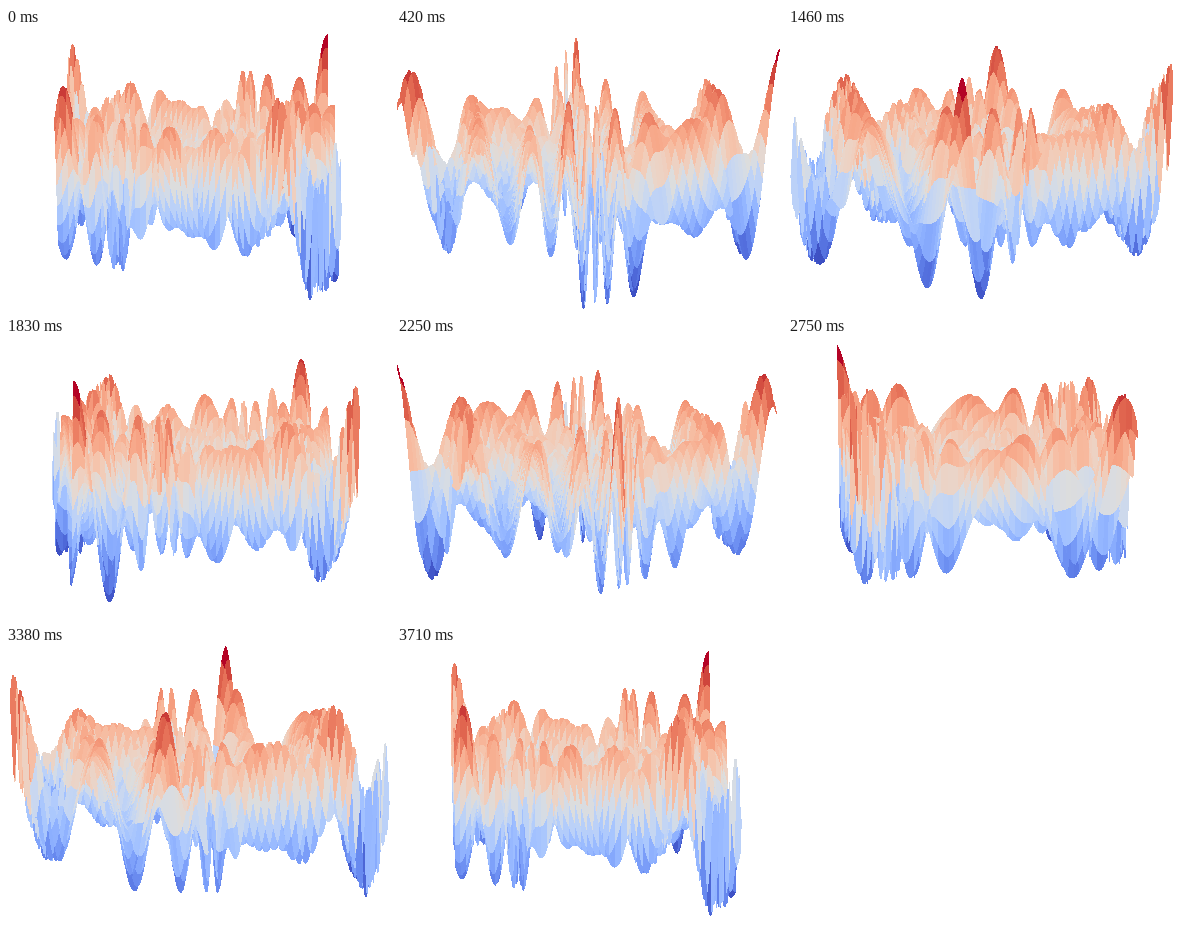
Write a matplotlib script that moves like this. It is 385x281 px and loops after 3.75 s.

```python
import numpy as np
import matplotlib.pyplot as plt
from matplotlib.animation import FuncAnimation
from matplotlib.collections import PolyCollection

WIDTH, HEIGHT, DPI = 385, 281, 100
FRAMES, LOOP_MS = 90, 3750

CELLS, SUB = 50, 4              # facets per side, outline steps per facet side
HALF_XY, HALF_Z = 0.5714, 0.466
DIST, SCALE = 10, 2368
CENTER = 192, 133
ELEV = np.radians(10)


def eggholder(x, y):
    y = y + 47
    return (-y * np.sin(np.sqrt(np.abs(x / 2 + y)))
            - x * np.sin(np.sqrt(np.abs(x - y))))


def facet_outlines():
    """Grid indices (rows, cols) of every facet's closed outline."""
    step = np.arange(SUB)
    zero, full = np.zeros(SUB, int), np.full(SUB, SUB)
    dr = np.concatenate([zero, step, full, SUB - step])
    dc = np.concatenate([step, full, SUB - step, zero])
    r0, c0 = np.divmod(np.arange(CELLS ** 2), CELLS)
    return r0[:, None] * SUB + dr, c0[:, None] * SUB + dc


side = np.linspace(-512, 512, CELLS * SUB + 1)
gx, gy = np.meshgrid(side, side)
gz = eggholder(gx, gy)
rows, cols = facet_outlines()

level = gz[rows, cols].mean(axis=1)
level = (level - level.min()) / np.ptp(level)
colors = plt.get_cmap("coolwarm")(level)

bx, by = gx * HALF_XY / 512, gy * HALF_XY / 512
bz = (2 * (gz - gz.min()) / np.ptp(gz) - 1) * HALF_Z


def project(azim):
    """Screen x, screen y and distance to the camera for the whole grid."""
    c, s = np.cos(azim), np.sin(azim)
    near = bx * c + by * s
    right = by * c - bx * s
    up = bz * np.cos(ELEV) - near * np.sin(ELEV)
    depth = DIST - near * np.cos(ELEV) - bz * np.sin(ELEV)
    return (CENTER[0] + SCALE * right / depth,
            CENTER[1] - SCALE * up / depth, depth)


fig = plt.figure(figsize=(WIDTH / DPI, HEIGHT / DPI), dpi=DPI, facecolor="white")
ax = fig.add_axes([0, 0, 1, 1])
ax.set(xlim=(0, WIDTH), ylim=(HEIGHT, 0))
ax.axis("off")
surface = PolyCollection([], linewidths=0, antialiaseds=False)
ax.add_collection(surface, autolim=False)


def draw(frame):
    px, py, depth = project(2 * np.pi * frame / FRAMES)
    order = np.argsort(-depth[rows, cols].mean(axis=1), kind="stable")
    r, c = rows[order], cols[order]
    surface.set_verts(np.stack([px[r, c], py[r, c]], axis=-1))
    surface.set_facecolor(colors[order])
    return surface,


anim = FuncAnimation(fig, draw, frames=FRAMES, interval=LOOP_MS / FRAMES,
                     repeat=True, repeat_delay=0)
plt.show()
```
